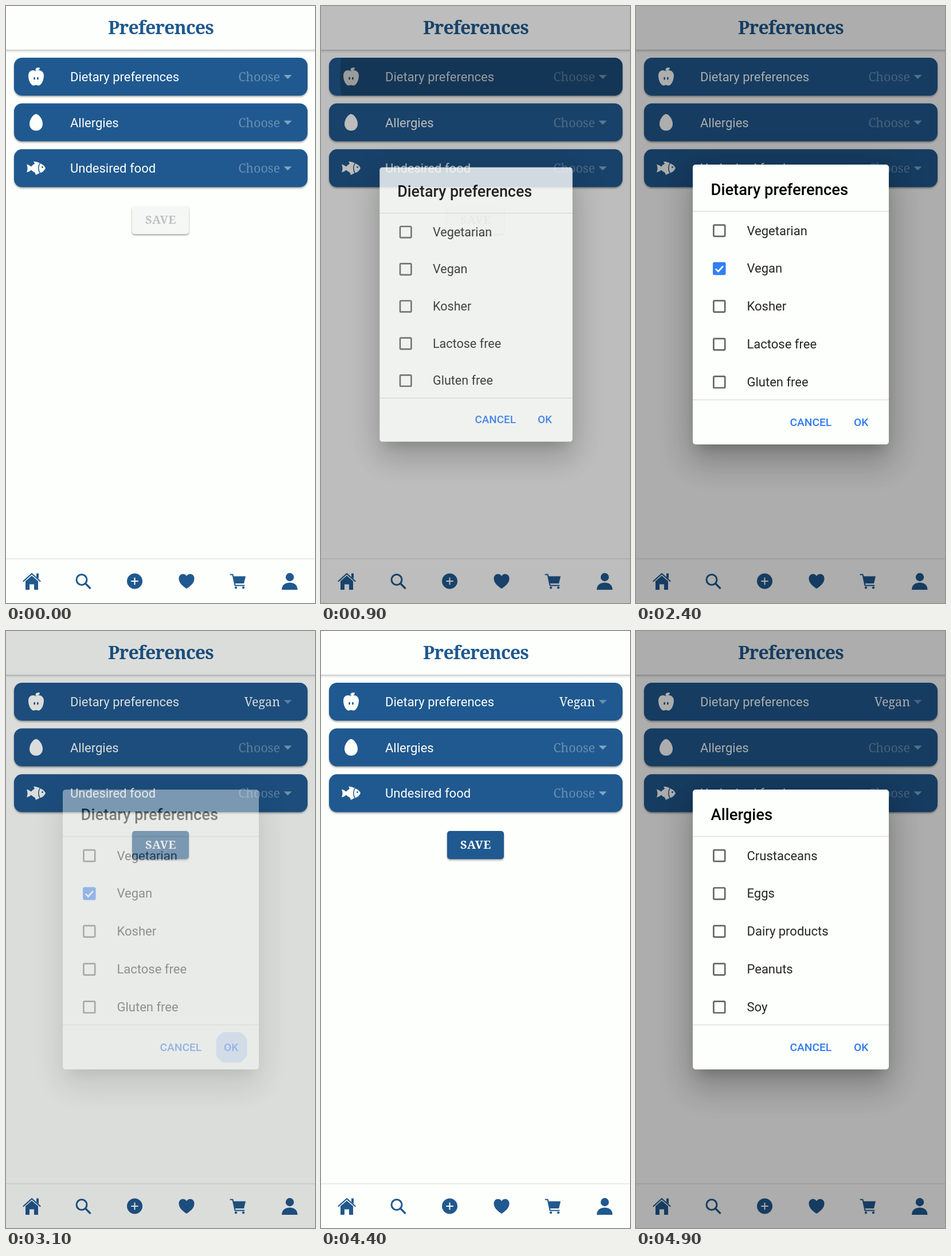
Animation, 539 px wide and 1039 px high, one loop 5000 ms. Source, as an HTML page:

```html
<!DOCTYPE html>
<html lang="en">
<head>
<meta charset="utf-8">
<title>Preferences</title>
<style>
  html, body { margin: 0; width: 100%; height: 100%; overflow: hidden; background: #fdfffd; }
  #stage { position: absolute; left: 0; top: 0; width: 539px; height: 1039px; overflow: hidden; background: #fdfffd; }
  svg { display: block; }
  text { font: 22px Roboto, sans-serif; }
  .slab { font-family: "Roboto Slab", "Noto Serif", serif; font-size: 21.5px; }
  .heading { font-size: 32px; font-weight: 700; letter-spacing: -.9px; fill: #1f598f; text-anchor: middle; }
  .save { font-size: 20px; font-weight: 700; letter-spacing: .5px; text-anchor: middle; }
  .raised { filter: drop-shadow(0 2px 1.5px rgba(0,0,0,.35)); }
  #backdrop { position: absolute; inset: 0; background: #000; }
  #modal { position: absolute; left: 98.5px; top: 276px; width: 342.5px; height: 487px; border-radius: 5px; background: #fdfffd;
    box-shadow: 0 15px 21px -10px rgba(0,0,0,.2), 0 33px 52px 4px rgba(0,0,0,.14), 0 12px 63px 11px rgba(0,0,0,.12); }
  .title { font-size: 27.4px; font-weight: 500; }
  .action { font-size: 19.2px; font-weight: 500; fill: #2f7bf0; }
  .option { fill: #262626; }
</style>
</head>
<body>
<div id="stage">
  <svg id="page" width="539" height="1039"></svg>
  <div id="backdrop"></div>
  <div id="modal"><svg id="dialog" width="342.5" height="487" viewBox="98.5 276 342.5 487"></svg></div>
</div>
<script>
const LOOP = 5000, STEP = 100, FADE = 150;
const BLUE = '#20598f';
const $ = id => document.getElementById(id);
const clamp = v => Math.max(0, Math.min(1, v));
const smooth = v => { v = clamp(v); return v * v * (3 - 2 * v); };
const mix = (a, b, p) => a + (b - a) * p;

const icons = {
  apple: `<path d="M52 113.5C48 111 39.5 111 39 121C38.8 130 44 138.5 48 138.5C50 138.5 50.5 137.5 52.3 137.5
      C54 137.5 55 138.5 57 138.5C61 138.5 66 130 66 121C65.5 111 56 111 52 113.5Z
      M51.5 112.5C51 108 54 106.5 59 107.5C59 111 56 113 51.5 112.5Z"/>
    <g fill="${BLUE}"><ellipse cx="49.6" cy="126" rx="1.4" ry="2.6"/><ellipse cx="55.4" cy="126" rx="1.4" ry="2.6"/></g>`,
  egg: `<path d="M52.5 188C57 188 64 197 64 205C64 212.5 59 217 52.5 217C46 217 41 212.5 41 205C41 197 48 188 52.5 188Z"/>`,
  fish: `<path d="M36 275.5Q40 276.5 44 279.5Q47 276 50 274.5L48 270.5Q56 271 59.5 274Q66 276 69 282
      Q66 289 59 290.5L52 294L50.5 290Q47 288.5 44 285.5Q40 289 36 289.5Q39 282.5 36 275.5Z"/>
    <path d="M59 274Q54.5 282 59 290.5" fill="none" stroke="${BLUE}" stroke-width="1.5"/>
    <circle cx="63.5" cy="280.5" r="1.4" fill="${BLUE}"/>`,
};

const cards = [
  { y: 90, icon: icons.apple, label: 'Dietary preferences' },
  { y: 169.5, icon: icons.egg, label: 'Allergies' },
  { y: 249.3, icon: icons.fish, label: 'Undesired food' },
];

const cardMarkup = ({ y, icon, label }, i) => `
  <clipPath id="clip${i}"><rect x="14" y="${y}" width="512" height="66" rx="14"/></clipPath>
  <rect class="raised" x="14" y="${y}" width="512" height="66" rx="14" fill="${BLUE}"/>
  <g fill="#fdfffd">${icon}<text x="112" y="${y + 41}">${label}</text>
    <text class="slab" id="value${i}" x="478" y="${y + 41}" text-anchor="end"></text>
    <path id="arrow${i}" d="M484.5 ${y + 30}h14l-7 7z"/></g>
  <g clip-path="url(#clip${i})"><circle id="ripple${i}"/></g>`;

const navMarkup = `
  <path d="M0 962H539" stroke="#000" stroke-opacity=".1" stroke-width="1.4"/>
  <g fill="${BLUE}">
    <path d="M34 1001L45 991.5L56 1001V1016H49V1006.5H41V1016H34ZM53 987.5H57V997L53 993.5Z"/>
    <circle cx="224.5" cy="1001" r="13.5"/>
    <path d="M315 1014C305 1007.5 301.5 1002.5 301.5 996C301.5 988.5 310.5 985.5 315 992
      C319.5 985.5 328.5 988.5 328.5 996C328.5 1002.5 325 1007.5 315 1014Z"/>
    <path d="M396.5 992.5H418L415 1005H399.5Z"/>
    <circle cx="401" cy="1012.3" r="2.1"/><circle cx="414" cy="1012.3" r="2.1"/>
    <circle cx="495" cy="994" r="7.2"/>
    <path d="M481 1016C481 1007 488 1003.5 495 1003.5C502 1003.5 508.5 1007 508.5 1016Z"/>
  </g>
  <g fill="none" stroke="${BLUE}" stroke-linecap="round" stroke-linejoin="round">
    <path d="M30.5 1001L45 988L59.5 1001" stroke-width="2.2"/>
    <circle cx="132" cy="998.5" r="9" stroke-width="3"/><path d="M139 1005.5L146.5 1013" stroke-width="3.4"/>
    <path d="M391.5 989.5H395.5L399.5 1008.5H415.5" stroke-width="2"/>
    <path d="M224.5 995.5V1006.5M219 1001H230" stroke="#fdfffd" stroke-width="2"/>
  </g>`;

$('page').innerHTML = `
  <linearGradient id="edge" x2="0" y2="1"><stop stop-opacity=".24"/><stop offset=".4" stop-opacity=".09"/><stop offset="1" stop-opacity="0"/></linearGradient>
  <rect y="76" width="539" height="6" fill="url(#edge)"/>
  <text class="slab heading" x="270" y="49">Preferences</text>
  ${cards.map(cardMarkup).join('')}
  <rect class="raised" id="saveBox" x="220" y="348" width="99" height="49" rx="5"/>
  <text class="slab save" id="saveText" x="270" y="379">SAVE</text>
  ${navMarkup}`;

const dialogs = {
  diet: ['Dietary preferences', 'Vegetarian', 'Vegan', 'Kosher', 'Lactose free', 'Gluten free'],
  allergy: ['Allergies', 'Crustaceans', 'Eggs', 'Dairy products', 'Peanuts', 'Soy'],
};

function optionMarkup(label, i, checked) {
  const y = 391 + i * 65.9;
  return `<rect x="134.9" y="${y - 9.9}" width="19.8" height="19.8" rx="1.6" stroke-width="2.7"
      fill="${checked ? '#337ef7' : 'none'}" stroke="${checked ? '#337ef7' : '#666'}"/>
    ${checked ? `<path d="M138.3 ${y + .5}l4.6 4.6l8.6-9.4" fill="none" stroke="#fff" stroke-width="2.6"/>` : ''}
    <text class="option" x="193" y="${y + 7.5}">${label}</text>`;
}

let shown = '';
function fillDialog(name, checked) {
  if (shown === name + checked) return;
  shown = name + checked;
  const [title, ...options] = dialogs[name];
  $('dialog').innerHTML = `
    <clipPath id="okClip"><rect x="366" y="698" width="54" height="53" rx="6"/></clipPath>
    <text class="title" x="130" y="328.5">${title}</text>
    <path d="M98 357.5H442M98 685.5H442" stroke="#dcdedc" stroke-width="1.4"/>
    ${options.map((label, i) => optionMarkup(label, i, i === checked)).join('')}
    <text class="action" x="268" y="730.5">CANCEL</text><text class="action" x="379.5" y="730.5">OK</text>
    <g clip-path="url(#okClip)"><circle id="okRipple" fill="#3880ff"/></g>`;
}

// Grows from the touch point to the middle of the pressed box, then fades.
function ripple(id, age, fromX, toX, y, fromR, toR, strength) {
  const grow = 1 - (1 - clamp(age / 225)) ** 3;
  const alpha = age < 0 ? 0 : clamp(age / 75) * clamp((300 - age) / 150);
  const circle = $(id);
  circle.setAttribute('cx', mix(fromX, toX, grow));
  circle.setAttribute('cy', y);
  circle.setAttribute('r', mix(fromR, toR, grow));
  circle.setAttribute('opacity', alpha * strength);
}

function render(t) {
  const saved = t >= 3010;
  cards.forEach((card, i) => {
    const chosen = saved && i === 0;
    $('value' + i).textContent = chosen ? 'Vegan' : 'Choose';
    $('value' + i).setAttribute('opacity', chosen ? 1 : .33);
    $('arrow' + i).setAttribute('opacity', chosen ? .33 : .45);
  });
  $('saveBox').setAttribute('fill', saved ? BLUE : '#f5f7f7');
  $('saveText').setAttribute('fill', saved ? '#fdfffd' : '#bdbfbf');

  const allergies = t >= 4000;
  fillDialog(allergies ? 'allergy' : 'diet', !allergies && t >= 1800 ? 1 : -1);
  const enter = smooth((t - (allergies ? 4513 : 792)) / FADE);
  const leave = allergies ? 0 : smooth((t - 3017) / FADE);
  const visible = enter * (1 - leave);
  $('backdrop').style.opacity = .32 * visible;
  $('modal').style.opacity = visible;
  $('modal').style.transform = `scale(${.9 + .1 * enter})`;

  ripple('ripple0', t - 776, 450, 270, 123, 153, 263, .18);
  ripple('ripple1', t - 4492, 450, 270, 202.5, 153, 263, .18);
  ripple('ripple2', -1, 0, 0, 0, 0, 0, 0);
  ripple('okRipple', t - 2975, 393, 393, 724.5, 12, 32, .28);
}

const start = performance.now();
function tick() {
  const elapsed = (performance.now() - start) % LOOP;
  render(Math.floor(elapsed / STEP) * STEP);
  requestAnimationFrame(tick);
}
tick();
</script>
</body>
</html>
```
